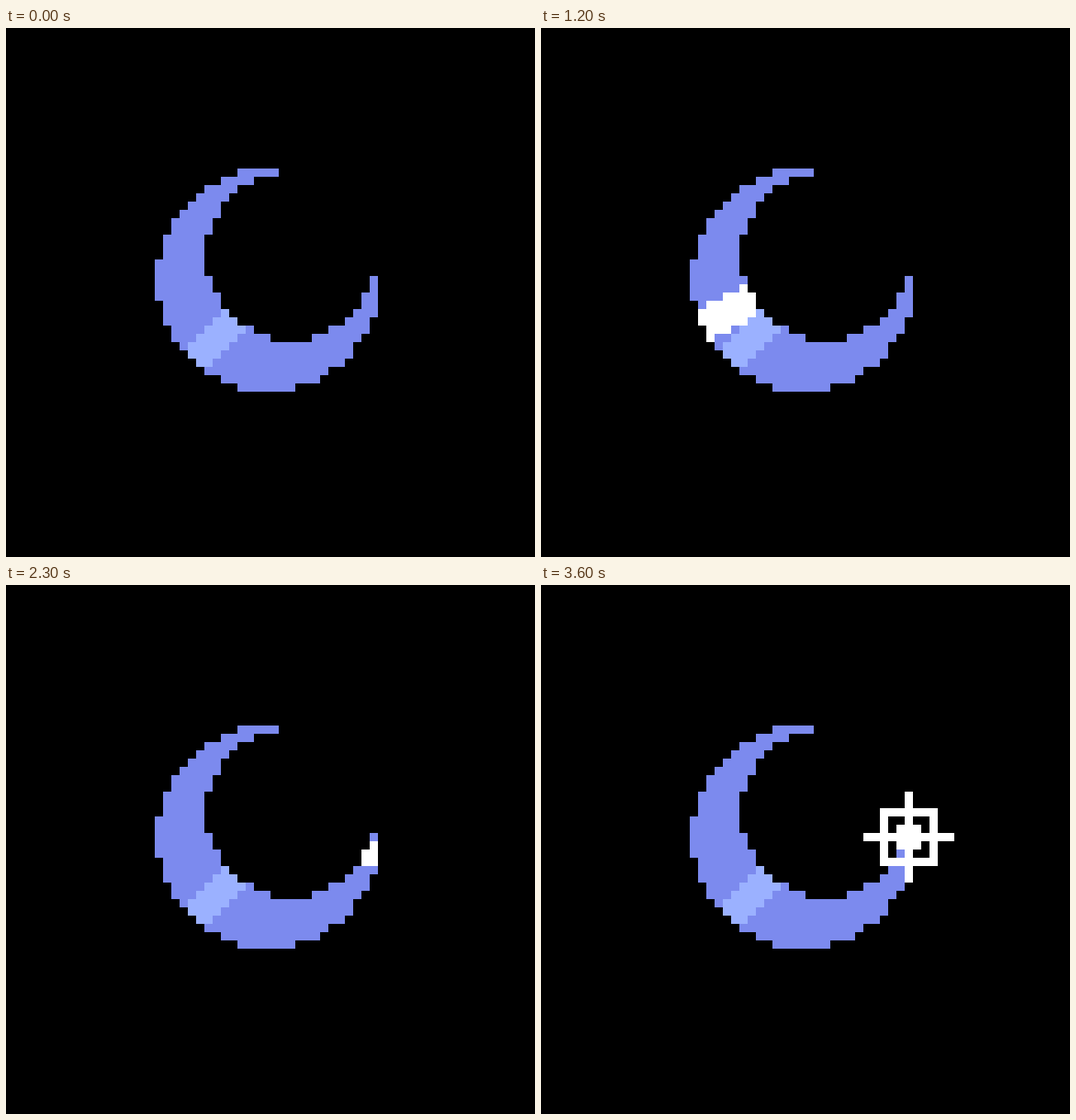
Animation, 640 px wide and 640 px high, one loop 3.8 s. Source, as an HTML page with a canvas:

```html
<!DOCTYPE html>
<html lang="en">
<head>
<meta charset="utf-8">
<title>Moon</title>
<style>
html, body { margin: 0; width: 100%; height: 100%; overflow: hidden; background: #000; }
canvas { display: block; width: 100%; height: 100%; image-rendering: pixelated; }
</style>
</head>
<body>
<canvas id="stage" width="640" height="640"></canvas>
<script>
const ctx = document.getElementById('stage').getContext('2d');
const GRID = 64;
ctx.scale(10, 10);

const BLUE = '#7c8aee', PALE = '#9bb1ff', WHITE = '#fff';
const STEP = 100, STEPS = 38, LAST = 36;

// Discs on the cell grid: centre and squared radius
const disc = { x: 31.2, y: 30, r2: 180 };
const shade = { x: 34, y: 27.05, r2: 104.9 };
const inside = (d, x, y) => (x - d.x) ** 2 + (y - d.y) ** 2 <= d.r2;

const moon = [];
for (let y = 0; y < GRID; y++) {
  for (let x = 0; x < GRID; x++) {
    if (inside(disc, x, y) && !inside(shade, x, y)) moon.push({ x, y });
  }
}
const band = moon.filter(c => c.x + c.y >= 60 && c.x + c.y <= 64);

// Glint path: step, degrees counter-clockwise from the top
const path = [[1, 0], [6, 32], [9, 68], [15, 161], [19, 230], [24, 270]];

function glintAngle(step) {
  const i = Math.max(1, path.findIndex(p => p[0] >= step));
  const [s0, a0] = path[i - 1], [s1, a1] = path[i];
  return (a0 + (a1 - a0) * (step - s0) / (s1 - s0)) * Math.PI / 180;
}

function fill(color, list) {
  ctx.fillStyle = color;
  for (const c of list) ctx.fillRect(c.x, c.y, 1, 1);
}

// A radial strip across the crescent, wider where the moon is thick
function glint(step) {
  if (step < 1 || step > 24) return [];
  const a = glintAngle(step), sin = Math.sin(a), cos = Math.cos(a);
  const half = 1.575 + 0.45 * Math.max(0, Math.cos(a - Math.PI * 0.75));
  return moon.filter(({ x, y }) => {
    const dx = x - 31, dy = y - 30;
    return dx * sin + dy * cos < 0 && Math.abs(dy * sin - dx * cos) < half;
  });
}

function drawStar(step) {
  if (step < 26) return;
  const x = 44, y = 30;
  const rect = (dx, dy, w, h) => ctx.fillRect(x + dx, y + dy, w, h);
  ctx.fillStyle = WHITE;
  if (step < 28) return rect(0, 0, 1, step - 25);

  rect(-1, 0, 3, 2);
  rect(-1, -1, step > 28 ? 3 : 2, 1);
  const arm = Math.min(5, Math.floor(step / 2) - 12);
  if (step > 28) {
    rect(-arm, 0, arm * 2 + 1, 1);
    rect(0, -arm, 1, arm * 2 + 1);
  }
  if (step >= 30) {
    for (const side of [-3, 3]) {
      rect(-3, side, 7, 1);
      rect(side, -3, 1, 7);
    }
  }
}

function draw(step) {
  ctx.clearRect(0, 0, GRID, GRID);
  fill(BLUE, moon);
  fill(WHITE, glint(step));
  fill(PALE, band);
  drawStar(step);
}

const start = performance.now();
function tick() {
  const time = performance.now() - start;
  draw(Math.min(LAST, Math.floor(time / STEP) % STEPS));
  requestAnimationFrame(tick);
}
tick();
</script>
</body>
</html>
```
